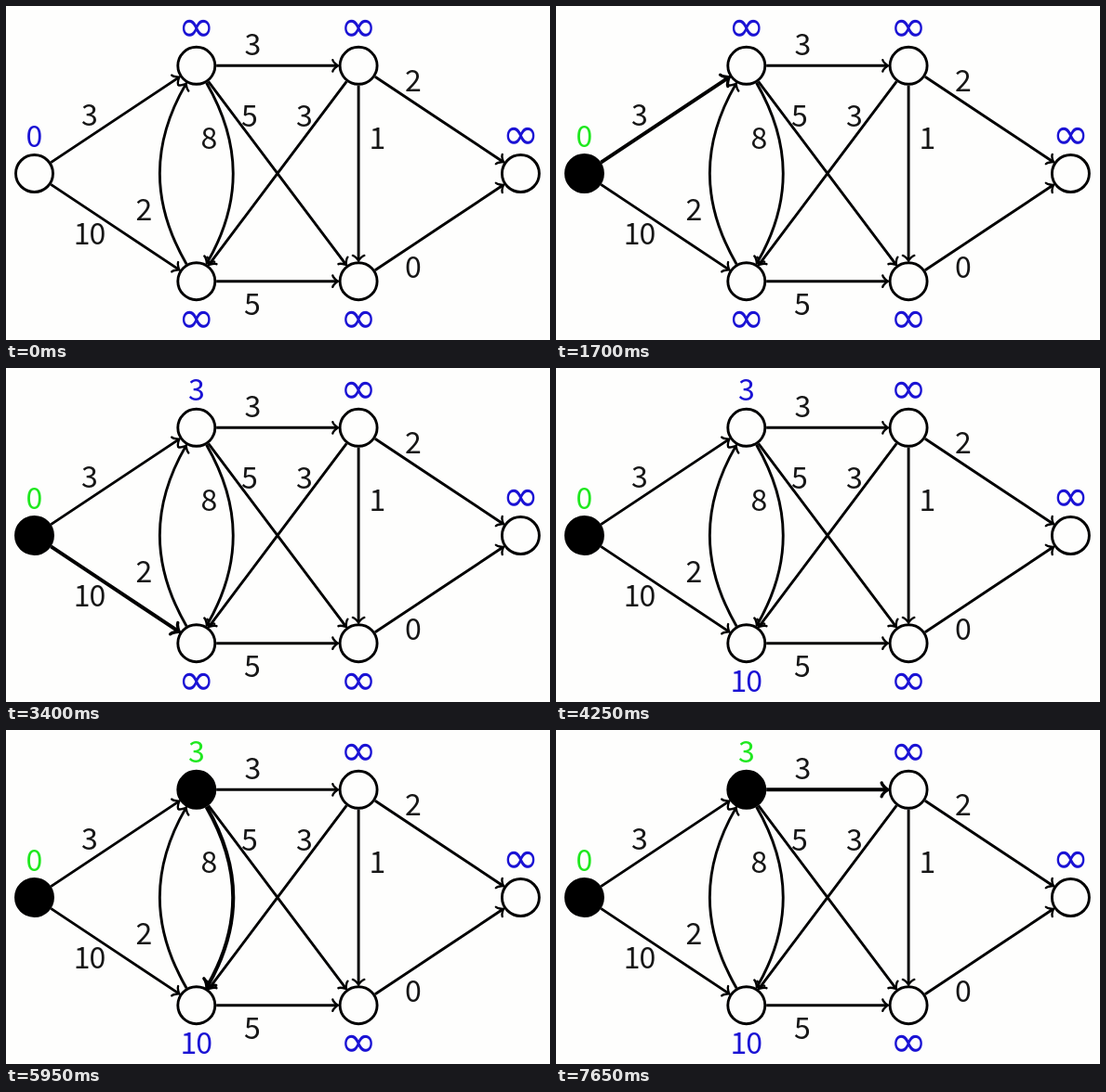
An HTML page for the animation above (8000 ms loop, 585x360 px).

```html
<!DOCTYPE html>
<html lang="en">
<head>
<meta charset="utf-8">
<title>Shortest paths</title>
<style>
  html, body { margin: 0; width: 100%; height: 100%; overflow: hidden; background: #fefefd; }
  svg { display: block; width: 585px; height: 360px; }
  text {
    font: 400 32px "Noto Sans CJK JP", "Noto Sans CJK SC", "Noto Sans CJK", sans-serif;
    letter-spacing: -1px; text-anchor: middle; fill: #161616; transform: translateX(-.5px);
  }
  .dist { fill: #1a12d4; }
  .dist.done { fill: #1fe81f; }
  .dist.inf { font: 48px "DejaVu Sans", sans-serif; letter-spacing: 0; transform: none; }
  .edge path { fill: none; stroke: #000; stroke-width: 2.9px; }
  .edge .head { stroke-width: 2.4px; stroke-linecap: round; stroke-linejoin: round; }
  .edge.bold .line { stroke-width: 4.1px; }
  .edge.bold .head { stroke-width: 2.8px; }
  .node { fill: #fefefd; stroke: #000; stroke-width: 2.9px; }
  .node.done { fill: #000; }
</style>
</head>
<body>
<svg id="stage" viewBox="0 0 585 360"></svg>
<script>
const STEP = 850, LOOP = 8000, GAP = 21.4;
const stage = document.getElementById('stage');

// x, y, label y
const nodes = {
  s: [30.5, 180.5, 140], a: [204.8, 64.3, 23], b: [204.8, 296.7, 337],
  c: [379.1, 64.3, 23], d: [379.1, 296.7, 337], e: [553.4, 180.5, 139]
};

// from-to: weight, label x, label y, bend in degrees
const edges = {
  sa: [3, 90, 117], sb: [10, 90, 245],
  ab: [8, 218.5, 142, 30], ba: [2, 148.5, 219, 30],
  ac: [3, 265.5, 41], ad: [5, 262, 118], cb: [3, 321, 118],
  cd: [1, 399.5, 142], bd: [5, 265, 321],
  ce: [2, 438, 80], de: [0, 438, 281]
};

const start = { done: '', dist: { s: 0 }, bold: '' };
const changes = [
  {},
  { done: 's' },
  { bold: 'sa' },
  { bold: '', dist: { s: 0, a: 3 } },
  { bold: 'sb' },
  { bold: '', dist: { s: 0, a: 3, b: 10 } },
  { done: 'sa' },
  { bold: 'ab' },
  { bold: '' },
  { bold: 'ac' }
];
let last = start;
const steps = changes.map(change => last = { ...last, ...change });

function add(parent, tag, attrs, text = '') {
  const el = document.createElementNS('http://www.w3.org/2000/svg', tag);
  for (const key in attrs) el.setAttribute(key, attrs[key]);
  el.textContent = text;
  return parent.appendChild(el);
}

function polar([x, y], angle, r) {
  return [x + r * Math.cos(angle), y + r * Math.sin(angle)];
}

function makeEdge(id) {
  const [weight, x, y, bend = 0] = edges[id];
  const from = nodes[id[0]], to = nodes[id[1]];
  const angle = Math.atan2(to[1] - from[1], to[0] - from[0]);
  const turn = bend * Math.PI / 180;
  const out = angle - turn, into = angle + turn;
  const p = polar(from, out, GAP), q = polar(to, into, -GAP);
  const reach = .3915 * Math.hypot(q[0] - p[0], q[1] - p[1]);
  const end = polar(q, into, -1.2);
  const g = add(stage, 'g', { class: 'edge' });
  add(g, 'path', {
    class: 'line',
    d: `M${p}C${polar(p, out, reach)} ${polar(q, into, -reach)} ${end}`
  });
  const head = add(g, 'path', {
    class: 'head',
    d: 'M-5.8-6.2C-5.4-3.9-1.2-.4 0 0C-1.2.4-5.4 3.9-5.8 6.2'
  });
  add(stage, 'text', { x, y: y + 11.5 }, weight);
  return bold => {
    g.classList.toggle('bold', bold);
    head.setAttribute('transform',
      `translate(${polar(q, into, -.6)}) rotate(${into * 180 / Math.PI}) scale(${bold ? 1.2 : 1})`);
  };
}

function makeNode(id) {
  const [cx, cy, y] = nodes[id];
  const circle = add(stage, 'circle', { class: 'node', cx, cy, r: 20 });
  const label = add(stage, 'text', { x: cx });
  return (done, dist) => {
    const inf = dist === undefined;
    circle.classList.toggle('done', done);
    label.setAttribute('class', `dist${done ? ' done' : ''}${inf ? ' inf' : ''}`);
    label.setAttribute('y', y + (inf ? 15 : 11.5));
    label.textContent = inf ? '∞' : dist;
  };
}

const edgeViews = Object.keys(edges).map(id => [id, makeEdge(id)]);
const nodeViews = Object.keys(nodes).map(id => [id, makeNode(id)]);

let shown = -1;
function show(index) {
  if (index === shown) return;
  shown = index;
  const { done, dist, bold } = steps[index];
  for (const [id, set] of edgeViews) set(id === bold);
  for (const [id, set] of nodeViews) set(done.includes(id), dist[id]);
}

function tick() {
  show(Math.floor(performance.now() % LOOP / STEP));
  requestAnimationFrame(tick);
}
tick();
</script>
</body>
</html>
```
